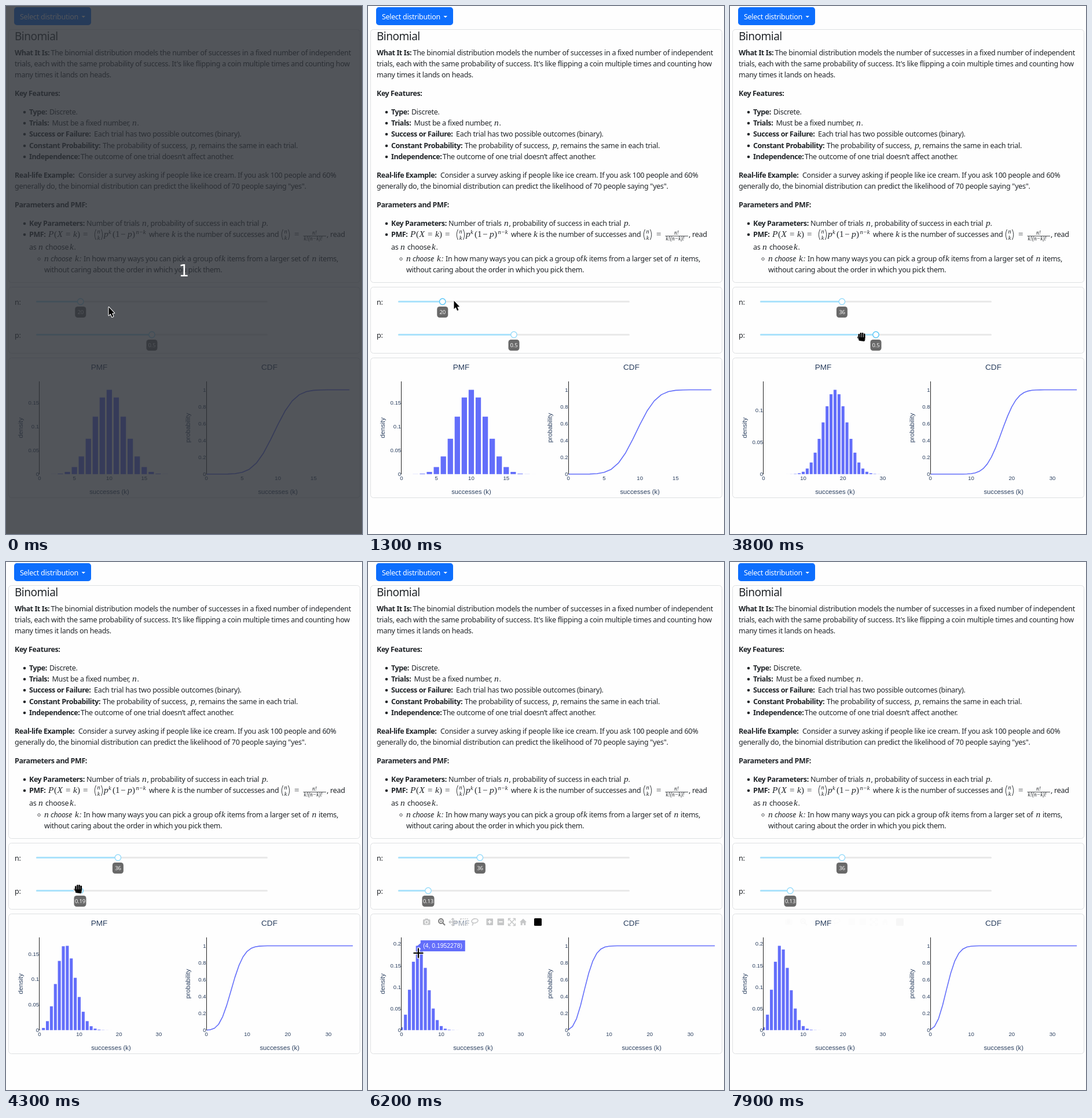
These frames come from a looping animation (615 px wide and 910 px high, 8 s). An HTML page with a canvas:

```html
<!DOCTYPE html>
<html lang="en">
<head>
<meta charset="utf-8">
<title>Binomial distribution</title>
<style>
html, body { margin: 0; width: 615px; height: 910px; overflow: hidden; background: #fefefe; }
canvas { display: block; }
</style>
</head>
<body>
<canvas id="stage" width="615" height="910"></canvas>
<script>
const ctx = document.getElementById('stage').getContext('2d');
const LOOP = 8000, STEP = 100;
const INK = '#212529', PLOT_INK = '#2a3f5f', BLUE = '#636efa';
const SANS = '"Noto Sans", sans-serif', ARIAL = '"Liberation Sans", Arial, sans-serif';
const SERIF = '"Liberation Serif", serif';

// style: [font, letter spacing]
const STYLES = {
  h: ['19px ' + SANS, -0.5],
  r: ['12.5px ' + SANS, -0.28],
  b: ['bold 12.5px ' + SANS, -0.42],
  i: ['italic 12.5px ' + SANS, -0.28],
  m: ['italic 15.5px ' + SERIF, 0],
  u: ['15px ' + SERIF, 0],
  s: ['italic 10.5px ' + SERIF, 0],
  f: ['italic 9.5px ' + SERIF, 0]
};

// baseline, then runs of style, x, text
const PAGE = [
  [59, 'h', 15, 'Binomial'],
  [85, 'b', 15, 'What It Is:', 'r', 77.5, 'The binomial distribution models the number of successes in a fixed number of independent'],
  [104, 'r', 15, "trials, each with the same probability of success. It's like flipping a coin multiple times and counting how"],
  [123, 'r', 15, 'many times it lands on heads.'],
  [155, 'b', 15, 'Key Features:'],
  [187, 'b', 40, 'Type:', 'r', 75, 'Discrete.'],
  [206, 'b', 40, 'Trials:', 'r', 79.5, 'Must be a fixed number,', 'm', 218, 'n', 'r', 226.5, '.'],
  [225, 'b', 40, 'Success or Failure:', 'r', 152, 'Each trial has two possible outcomes (binary).'],
  [245, 'b', 40, 'Constant Probability:', 'r', 167, 'The probability of success,', 'm', 319, 'p', 'r', 326.5, ', remains the same in each trial.'],
  [264, 'b', 40, 'Independence:', 'r', 129, 'The outcome of one trial doesn’t affect another.'],
  [296, 'b', 15, 'Real-life Example:', 'r', 125, 'Consider a survey asking if people like ice cream. If you ask 100 people and 60%'],
  [315, 'r', 15, 'generally do, the binomial distribution can predict the likelihood of 70 people saying "yes".'],
  [347, 'b', 15, 'Parameters and PMF:'],
  [379, 'b', 40, 'Key Parameters:', 'r', 139, 'Number of trials', 'm', 235, 'n', 'r', 243.5, ', probability of success in each trial', 'm', 442, 'p', 'r', 449.5, '.'],
  [398, 'b', 40, 'PMF:', 'm', 73, 'P', 'u', 83, '(', 'm', 88.5, 'X', 'u', 103, '=', 'm', 116, 'k', 'u', 123, ')', 'u', 133, '=',
    'm', 169, 'p', 'u', 184, '(1', 'u', 198, '−', 'm', 210, 'p', 'u', 218, ')',
    'r', 247, 'where', 'm', 286, 'k', 'r', 296, 'is the number of successes and', 'u', 498, '=', 'r', 554, ', read'],
  [393, 's', 177, 'k', 's', 224.5, 'n−k'],
  [394, 'f', 529, 'n!'],
  [404, 'f', 514.5, 'k!(n−k)!'],
  [420, 'r', 40, 'as', 'm', 56, 'n', 'r', 68, 'choose', 'm', 110, 'k', 'r', 117.5, '.'],
  [440, 'm', 66, 'n', 'i', 77, 'choose', 'm', 119, 'k', 'i', 127, ':', 'r', 134, 'In how many ways you can pick a group of',
    'm', 372, 'k', 'r', 382, 'items from a larger set of', 'm', 528.5, 'n', 'r', 540, 'items,'],
  [459, 'r', 66, 'without caring about the order in which you pick them.'],
  [515, 'r', 15, 'n:'],
  [572, 'r', 15, 'p:']
];

// time, x, y, shape
const CURSOR = [
  [0, 177, 519, 'arrow'], [100, 183, 517, 'arrow'], [300, 198, 508, 'arrow'], [400, 198, 508, 'arrow'],
  [600, 150, 507, 'arrow'], [700, 128, 508, 'open'], [1200, 128, 508, 'open'], [1300, 148, 508, 'arrow'],
  [1500, 172, 510, 'fist'], [1800, 193, 511, 'fist'], [1900, 193, 511, 'open'], [2200, 193, 511, 'open'],
  [2300, 200, 518, 'arrow'], [2900, 259, 566, 'arrow'], [3100, 259, 566, 'arrow'], [3200, 253, 569, 'open'],
  [3700, 252, 569, 'open'], [3800, 227, 570, 'fist'], [4400, 104, 562, 'fist'], [4500, 104, 562, 'open'],
  [4600, 104, 562, 'open'], [4700, 103, 580, 'arrow'], [4900, 95, 612, 'point'], [5000, 92, 634, 'cross'],
  [5400, 88, 675, 'cross'], [6100, 88, 675, 'cross'], [6200, 87, 674, 'cross'], [6600, 87.5, 686, 'cross'],
  [6700, 87.5, 686, 'cross'], [6900, 89, 691, 'cross'], [7400, 89, 691, 'cross'], [7500, 87, 660, 'cross'],
  [7600, 70, 560, 'arrow'], [7700, 40, 300, 'arrow'], [7800, 8, 20, 'arrow'], [7900, -60, -60, 'arrow']
];
const TRIALS = [[1300, 20], [1800, 36]];
const CHANCE = [[3800, 0.5], [4400, 0.13]];
const BAR_FADE = [[4800, 0], [4900, 0.14], [5200, 1], [7500, 1], [7900, 0.03]];
const TIP_FADE = [[4800, 0], [4900, 0.12], [5100, 0]];

function at(keys, t, col = 1) {
  let i = keys.findIndex(k => k[0] > t);
  if (i === 0) return keys[0][col];
  if (i < 0) return keys[keys.length - 1][col];
  const a = keys[i - 1], b = keys[i];
  return a[col] + (b[col] - a[col]) * (t - a[0]) / (b[0] - a[0]);
}

function text(str, x, y, font, color, align = 'left', spacing = 0) {
  ctx.font = font;
  ctx.letterSpacing = spacing + 'px';
  ctx.textAlign = align;
  ctx.fillStyle = color;
  ctx.fillText(str, x, y);
}

function box(x, y, w, h, r, fill, stroke) {
  ctx.beginPath();
  ctx.roundRect(x, y, w, h, r);
  if (fill) { ctx.fillStyle = fill; ctx.fill(); }
  if (stroke) { ctx.strokeStyle = stroke; ctx.lineWidth = 1; ctx.stroke(); }
}

function disc(x, y, r, fill, stroke, width = 1) {
  ctx.beginPath();
  ctx.arc(x, y, r, 0, 7);
  if (fill) { ctx.fillStyle = fill; ctx.fill(); }
  if (stroke) { ctx.strokeStyle = stroke; ctx.lineWidth = width; ctx.stroke(); }
}

function poly(pts, close) {
  ctx.beginPath();
  pts.forEach(([x, y]) => ctx.lineTo(x, y));
  if (close) ctx.closePath();
}

function lines(color, width, ...paths) {
  ctx.strokeStyle = color;
  ctx.lineWidth = width;
  for (const p of paths) { poly(p); ctx.stroke(); }
}

function choose(x) {
  ctx.strokeStyle = INK;
  ctx.lineWidth = 0.9;
  for (const [from, bend] of [[x + 3.5, -4.5], [x + 12.5, 4.5]]) {
    ctx.beginPath();
    ctx.moveTo(from, 385);
    ctx.quadraticCurveTo(from + bend, 394, from, 403);
    ctx.stroke();
  }
  text('n', x + 8, 392, STYLES.s[0], INK, 'center');
  text('k', x + 8, 403, STYLES.s[0], INK, 'center');
}

function page() {
  ctx.fillStyle = '#fefefe';
  ctx.fillRect(0, 0, 615, 910);
  for (const [y, h] of [[40.5, 436], [484.5, 114], [606.5, 241]]) box(4.5, y, 607, h, 5, null, '#dee0e2');
  box(14, 2, 133, 31, 4.8, '#0d6efd');
  text('Select distribution', 24, 23, STYLES.r[0], '#fff', 'left', -0.28);
  ctx.fillStyle = '#fff';
  poly([[130.5, 17], [137, 17], [133.75, 20.3]], true);
  ctx.fill();
  for (const [y, ...runs] of PAGE) {
    for (let i = 0; i < runs.length; i += 3) {
      const [font, gap] = STYLES[runs[i]];
      text(runs[i + 2], runs[i + 1], y, font, INK, 'left', gap);
    }
  }
  for (const y of [183, 202, 221, 241, 260, 375, 394]) disc(32, y, 2.3, INK);
  disc(57, 436, 2.2, null, INK, 0.8);
  choose(152);
  choose(475);
  lines(INK, 0.8, [[513.5, 396.5], [553, 396.5]]);
}

function slider(x, y, label, hot) {
  box(52, y - 1.6, 400, 3.2, 1.6, '#e9e9e9');
  box(52, y - 1.6, x - 52, 3.2, 1.6, '#abe2fb');
  disc(x, y, 5.2, '#fff', hot ? '#57c5f7' : '#96dbfa', 1.4);
  const w = label.length > 3 ? 21 : 19;
  box(x - w / 2, y + 8.5, w, 19, 4.5, '#696969');
  text(label, x, y + 21.4, '9.6px ' + SANS, '#f6f6f6', 'center', -0.2);
}

function binomial(n, p) {
  const out = [(1 - p) ** n];
  for (let k = 1; k <= n; k++) out.push(out[k - 1] * (n - k + 1) / k * p / (1 - p));
  return out;
}

function axes(x0, full, n, title, titleX, yName, yStep, yTop, scale) {
  const step = n > 25 ? 10 : 5;
  const w = n % step ? full : full - 6;
  const tick = '9.6px ' + ARIAL;
  for (let k = 0; k < n; k += step) text(k, x0 + k * w / n, 817.3, tick, PLOT_INK, 'center');
  for (let j = 0; j * yStep <= yTop; j++) {
    text(+(j * yStep).toFixed(2), x0 - 0.6, 810.2 - j * yStep * scale, tick, PLOT_INK, 'right');
  }
  text('successes (k)', x0 + w / 2, 841, '11.2px ' + ARIAL, PLOT_INK, 'center');
  text(title, titleX, 627, '13.6px ' + ARIAL, PLOT_INK, 'center');
  ctx.save();
  ctx.translate(x0 - 28.5, 727);
  ctx.rotate(-Math.PI / 2);
  text(yName, 0, 0, '11.2px ' + ARIAL, PLOT_INK, 'center');
  ctx.restore();
  return w / n;
}

function axisLine(x) {
  ctx.fillStyle = '#222';
  ctx.fillRect(x, 647, 1, 160);
}

function plots(n, p) {
  const pmf = binomial(n, p), peak = Math.max(...pmf), base = 806.8;
  const scale = 145.3 / peak;
  const dx = axes(57.8, 247.3, n, 'PMF', 161, 'density', 0.05, peak * 1.1, scale);
  ctx.save();
  ctx.beginPath();
  ctx.rect(57.8, 640, 13 + dx * n, 167);
  ctx.clip();
  ctx.fillStyle = BLUE;
  pmf.forEach((v, k) => ctx.fillRect(57.8 + (k - 0.4) * dx + 0.2, base - v * scale, dx * 0.8 - 0.4, v * scale));
  ctx.restore();
  axisLine(57);

  const dc = axes(346.2, 253, n, 'CDF', 455, 'probability', 0.2, 1.01, 145.3);
  let sum = 0;
  ctx.lineJoin = 'round';
  lines(BLUE, 1.6, pmf.map((v, k) => [346.2 + k * dc, base - (sum += v) * 145.3]));
  axisLine(346);
  return k => [57.8 + k * dx, base - pmf[k] * scale, pmf[k]];
}

function toolbar(alpha) {
  if (!alpha) return;
  ctx.save();
  ctx.globalAlpha = alpha;
  box(92, 612, 210, 17, 0, 'rgba(255,255,255,.5)');
  const c = '#c6c7c8';
  box(95, 616, 12.5, 9.5, 1.5, c);
  box(98.5, 614.5, 5.5, 3, 1, c);
  disc(101.2, 620.8, 2.7, c, '#fff', 1.2);
  disc(126, 619, 3.9, null, '#7c7c7c', 2);
  lines('#7c7c7c', 2.2, [[129, 622], [133, 626]]);
  lines('#7c7c7c', 1, [[124, 619], [128, 619]], [[126, 617], [126, 621]]);
  lines(c, 1.7, [[140, 620.5], [153, 620.5]], [[146.5, 614], [146.5, 627]]);
  lines(c, 1.3, [[142.5, 618], [140, 620.5], [142.5, 623]], [[150.5, 618], [153, 620.5], [150.5, 623]],
    [[144, 616.5], [146.5, 614], [149, 616.5]], [[144, 624.5], [146.5, 627], [149, 624.5]]);
  ctx.setLineDash([2, 1.6]);
  ctx.lineWidth = 1.6;
  ctx.strokeRect(160, 615, 12, 10.5);
  ctx.setLineDash([]);
  ctx.beginPath();
  ctx.ellipse(184.5, 618.5, 5.6, 3.7, -0.2, 0, 7);
  ctx.stroke();
  lines(c, 1.5, [[180.5, 621], [181.5, 624], [180, 626.5]]);
  box(204.5, 614.5, 11.5, 11.5, 1, c);
  box(223.5, 614.5, 11.5, 11.5, 1, c);
  lines('#fff', 1.8, [[207, 620.2], [213.5, 620.2]], [[210.2, 617], [210.2, 623.5]], [[226, 620.2], [232.5, 620.2]]);
  lines(c, 1.5, [[243, 615], [254, 626]], [[254, 615], [243, 626]]);
  for (const [x, y, a, b] of [[242.5, 614.5, 1, 1], [254.5, 614.5, -1, 1], [242.5, 626.5, 1, -1], [254.5, 626.5, -1, -1]]) {
    lines(c, 1.3, [[x + 4 * a, y], [x, y], [x, y + 4 * b]]);
  }
  ctx.fillStyle = c;
  poly([[262, 620.5], [268, 614.8], [274, 620.5], [272.3, 620.5], [272.3, 626], [269.3, 626], [269.3, 622.5],
    [266.7, 622.5], [266.7, 626], [263.7, 626], [263.7, 620.5]], true);
  ctx.fill();
  box(287, 614, 13, 13, 1.5, '#000');
  ctx.restore();
}

function tip(alpha) {
  if (!alpha) return;
  ctx.save();
  ctx.globalAlpha = alpha;
  box(-3, 631, 119, 20, 2, '#69738a');
  text('Download plot as a png', 109, 644.5, '9.6px ' + ARIAL, '#fff', 'right');
  ctx.restore();
}

function hover(k, [x, y, v]) {
  box(x + 5.5, y - 9.5, 77, 19, 0, BLUE);
  poly([[x, y], [x + 6, y - 5], [x + 6, y + 5]], true);
  ctx.fill();
  text(`(${k}, ${v.toFixed(7)})`, x + 10, y + 3.6, '10.4px ' + ARIAL, '#fff');
}

function outlined(width = 2) {
  ctx.strokeStyle = '#fff';
  ctx.lineWidth = width;
  ctx.lineJoin = 'round';
  ctx.stroke();
  ctx.fillStyle = '#000';
  ctx.fill();
}

function hand(kind) {
  const tops = { open: [-6, -8, -7.5, -6], fist: [-5, -7, -7, -5.5], point: [-1, 4, 5, 6] }[kind];
  const floor = kind === 'point' ? 15 : 8;
  const palm = floor - 8;
  ctx.beginPath();
  ctx.roundRect(-5.5, palm, 12, 8, 3);
  poly([[-4, palm + 1], [-7, palm - 0.5], [-7, palm + 2], [-3, palm + 7], [5, palm + 8], [6.5, palm + 5], [6.5, palm + 1]], true);
  outlined(2.4);
  tops.forEach((top, i) => {
    ctx.beginPath();
    ctx.roundRect(-5.5 + i * 3.1, top, 2.8, palm + 4 - top, 1.4);
    outlined(kind === 'fist' ? 1.2 : 1.5);
  });
  ctx.fillRect(-4.5, palm + 1, 10, 5.5);
}

function cursor(t) {
  const kind = CURSOR.filter(k => k[0] <= t).pop()[3];
  ctx.save();
  ctx.translate(at(CURSOR, t, 1), at(CURSOR, t, 2));
  if (kind === 'arrow') {
    poly([[0.5, 0], [0.5, 14.2], [3.7, 11.3], [6.1, 17], [8.5, 16], [6.1, 10.4], [10.2, 10.2]], true);
    outlined();
  } else if (kind === 'cross') {
    lines('#fff', 4.4, [[-9.5, 0], [9.5, 0]], [[0, -9.5], [0, 9.5]]);
    lines('#000', 2.2, [[-8.5, 0], [8.5, 0]], [[0, -8.5], [0, 8.5]]);
  } else {
    hand(kind);
  }
  ctx.restore();
}

function draw(t) {
  const n = Math.round(at(TRIALS, t)), p = +at(CHANCE, t).toFixed(2);
  page();
  slider(52 + (n - 1) * 400 / 99, 509.5, String(n), t >= 700 && t < 2300);
  slider(52 + 400 * p, 566.5, String(p), t >= 3200 && t < 4700);
  const bar = plots(n, p);
  toolbar(at(BAR_FADE, t));
  tip(at(TIP_FADE, t));
  if (t >= 5200 && t < 7500) {
    const k = t < 6800 ? 4 : 5;
    hover(k, bar(k));
  }
  if (t < 100) {
    ctx.fillStyle = 'rgba(44,48,54,.82)';
    ctx.fillRect(0, 0, 615, 910);
    text('1', 307.5, 466, '28px "DejaVu Sans", sans-serif', '#fff', 'center');
  }
  cursor(t);
}

let last = -1;
function tick(now) {
  const t = Math.floor(now % LOOP / STEP) * STEP;
  if (t !== last) draw(last = t);
  requestAnimationFrame(tick);
}
draw(0);
requestAnimationFrame(tick);
</script>
</body>
</html>
```
